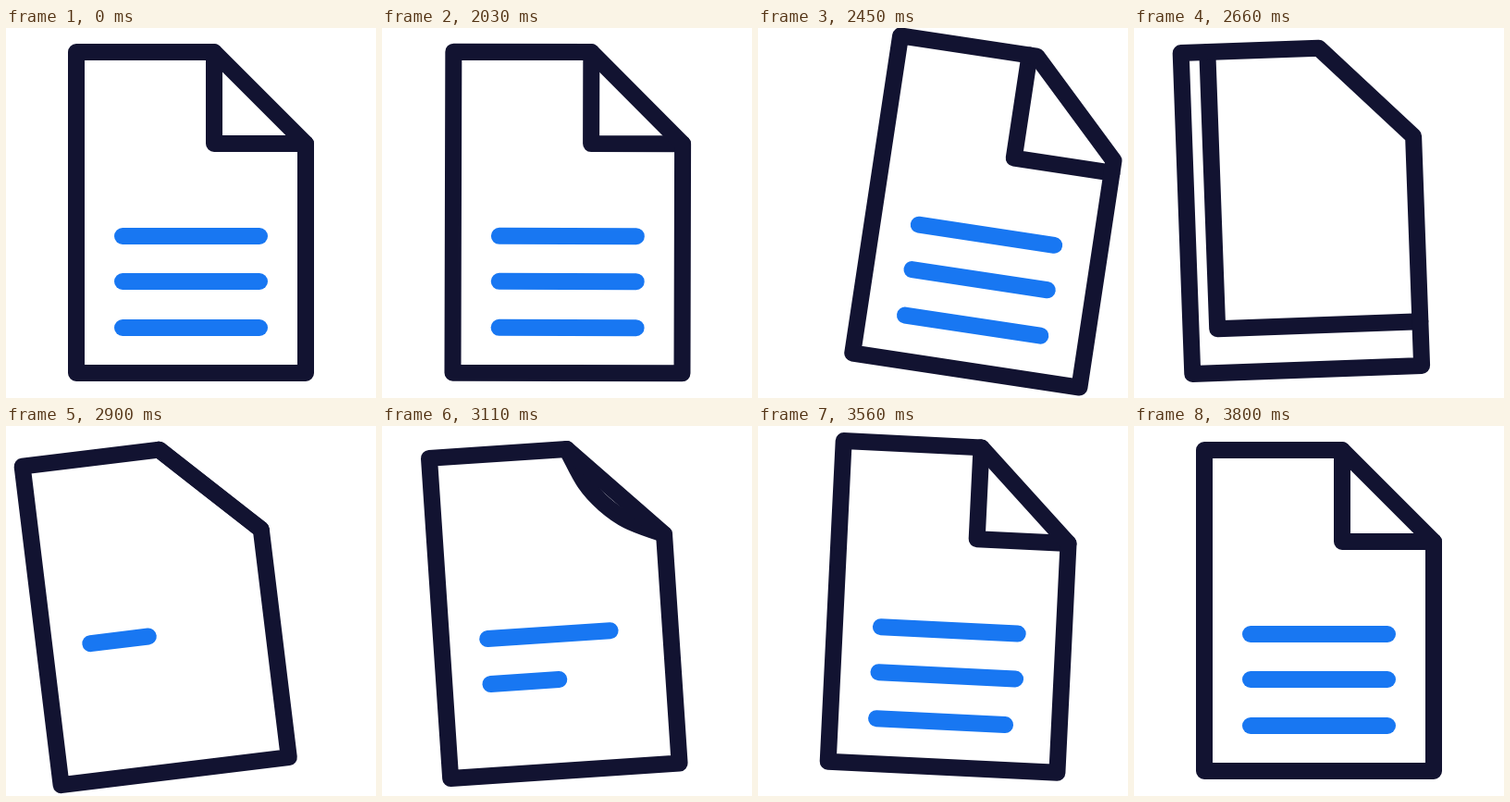
Write an HTML page with a canvas that moves like this. It is 400 px wide and 400 px high and loops after 3830 ms.

```html
<!DOCTYPE html>
<html lang="en">
<head>
<meta charset="utf-8">
<title>Page turn</title>
<style>
html, body { margin: 0; width: 100%; height: 100%; overflow: hidden; background: #fff; }
canvas { display: block; width: 400px; height: 400px; }
</style>
</head>
<body>
<canvas id="stage" width="400" height="400"></canvas>
<script>
const ctx = document.getElementById('stage').getContext('2d');
const LOOP = 3830, START = 2000, STEP = 30;
const INK = '#121331', BLUE = '#1877f2';
const L = 76, R = 324, T = 26, B = 373, CUT_X = 225, CUT_Y = 125;
const LINE_X = 126, LINE_W = 148, LINES = [225, 274, 324];

// Keys: [step, value]
const swayX = curve([[0, 0], [13, 54], [15, 50.7], [18, 23], [22, -19.1], [26, -37], [29, -39],
  [36, -17.5], [44, 13.7], [47, 16], [54, 4.7], [60, 0]]);
const swayY = curve([[0, 0], [15, -1], [18, -5.8], [22, -3.5], [30, 1.4], [36, 0.6],
  [44, -5.5], [47, -6], [54, -3], [60, 0]]);
const tilt = curve([[0, 0], [13.5, 9], [15, 8.6], [18, 4.2], [22, -2.08], [27.5, -7.2], [30, -6.95],
  [36, -4.6], [44, 4.15], [47, 5], [54, 1.8], [60, 0]]);

// Smooth curve through the keys, flat at its extremes
function curve(keys) {
  const rate = i => (keys[i + 1][1] - keys[i][1]) / (keys[i + 1][0] - keys[i][0]);
  const slopes = keys.map((k, i) => {
    if (i === 0 || i === keys.length - 1) return 0;
    const a = rate(i - 1), b = rate(i);
    return a * b <= 0 ? 0 : 2 * a * b / (a + b);
  });
  return n => {
    let i = 0;
    while (i < keys.length - 2 && n > keys[i + 1][0]) i++;
    const [n0, v0] = keys[i], [n1, v1] = keys[i + 1];
    const d = n1 - n0, u = clamp((n - n0) / d), w = 1 - u;
    return v0 * (1 + 2 * u) * w * w + v1 * u * u * (3 - 2 * u)
      + d * u * w * (slopes[i] * w - slopes[i + 1] * u);
  };
}

function clamp(v) { return Math.max(0, Math.min(1, v)); }
function mix(a, b, k) { return a + (b - a) * k; }
function smooth(n, from, to) {
  const u = clamp((n - from) / (to - from));
  return u * u * (3 - 2 * u);
}

// Quick start, long settle: cubic-bezier(.33, 0, 0, 1)
function settle(x) {
  x = clamp(x);
  let lo = 0, hi = 1;
  for (let i = 0; i < 24; i++) {
    const u = (lo + hi) / 2;
    if (u * (1 - u) * (1 - u) + u * u * u < x) lo = u; else hi = u;
  }
  return lo * lo * (3 - 2 * lo);
}

function trace(points, closed) {
  ctx.beginPath();
  points.forEach(p => ctx.lineTo(p[0], p[1]));
  if (closed) ctx.closePath();
}

function textLine(y, k) {
  if (k <= 0) return;
  ctx.strokeStyle = BLUE;
  trace([[LINE_X, y], [LINE_X + LINE_W * k, y]]);
  ctx.stroke();
}

// The folded corner sweeps over the whole sheet
function turningFold(k) {
  const x = mix(CUT_X, L, k), y = mix(CUT_Y, B, k);
  trace([[x, T], [CUT_X, T], [R, CUT_Y], [R, y], [x, y]], true);
  ctx.fillStyle = '#fff';
  ctx.fill();
  ctx.strokeStyle = INK;
  trace([[x, T], [x, y], [R, y]]);
  ctx.stroke();
}

// A new corner peels away from the diagonal
function newFold(k) {
  const d = 49.5 * (1 - k), x = CUT_X + d, y = CUT_Y - d;
  const h = 30 * (1 - k), near = 16 * (1 - k), far = 16 + 40 * k;
  ctx.beginPath();
  ctx.moveTo(CUT_X, T);
  ctx.bezierCurveTo(CUT_X + near, T + far, x - h, y - h, x, y);
  ctx.bezierCurveTo(x + h, y + h, R - far, CUT_Y - near, R, CUT_Y);
  ctx.strokeStyle = INK;
  ctx.stroke();
}

function draw(n) {
  ctx.setTransform(1, 0, 0, 1, 0, 0);
  ctx.fillStyle = '#fff';
  ctx.fillRect(0, 0, 400, 400);
  ctx.translate(200 + swayX(n), 200 + swayY(n));
  ctx.rotate(tilt(n) * Math.PI / 180);
  ctx.translate(-200, -200);
  ctx.lineWidth = 18;
  ctx.lineCap = ctx.lineJoin = 'round';

  if (n < 25.4) {
    LINES.forEach(y => textLine(y, 1));
    turningFold(smooth(n, 13.3, 25.4));
  } else {
    LINES.forEach((y, i) => textLine(y, settle((n - 25 - 6.5 * i) / 22)));
    newFold(smooth(n, 31, 49));
  }
  ctx.strokeStyle = INK;
  trace([[L, T], [CUT_X, T], [R, CUT_Y], [R, B], [L, B]], true);
  ctx.stroke();
}

const begin = performance.now();
function tick() {
  const t = Math.max(0, performance.now() - begin) % LOOP;
  draw(Math.max(0, Math.min(60, Math.floor((t - START) / STEP + 0.001))));
  requestAnimationFrame(tick);
}
tick();
</script>
</body>
</html>
```
